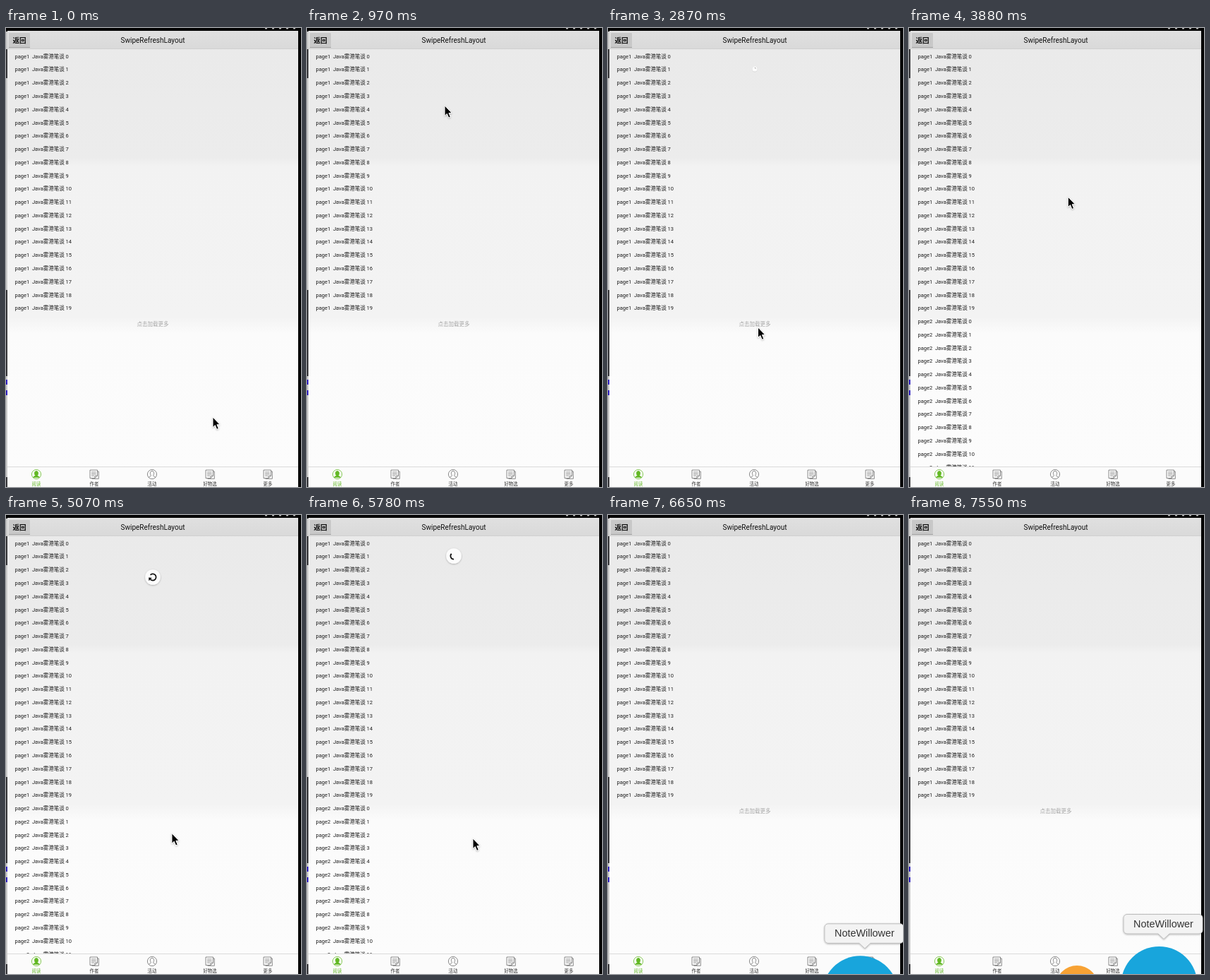
An HTML page for the animation above (7.6 s loop, 418 by 650 pixels).

```html
<!DOCTYPE html>
<html lang="zh">
<head>
<meta charset="utf-8">
<title>SwipeRefreshLayout</title>
<style>
  html, body { margin: 0; width: 100%; height: 100%; overflow: hidden; background: #000; }
  svg { display: block; width: 418px; height: 650px; }
  text { font-family: Roboto, "Noto Sans CJK SC", "Noto Sans CJK", sans-serif; white-space: pre; }
  .row { font-size: 7.5px; fill: #1c1c1c; }
  .mid { text-anchor: middle; }
  .icon { fill: none; stroke: #666; stroke-width: .75; }
  .icon.on { stroke: #62b823; }
  .icon.on path { fill: #62b823; }
  .tip { font: 14.4px "Liberation Sans", Arial, sans-serif; fill: #333; }
</style>
</head>
<body>
<svg viewBox="0 0 418 650">
  <defs>
    <linearGradient id="page" x2="0" y2="1">
      <stop offset="0" stop-color="#eaeaea"/>
      <stop offset=".26" stop-color="#ececec"/>
      <stop offset=".28" stop-color="#f2f2f2"/>
      <stop offset=".64" stop-color="#f3f3f3"/>
      <stop offset=".68" stop-color="#fbfbfb"/>
      <stop offset="1" stop-color="#fcfcfc"/>
    </linearGradient>
    <linearGradient id="bar" x2="0" y2="1">
      <stop offset="0" stop-color="#e0e0e0"/>
      <stop offset="1" stop-color="#d9d9d9"/>
    </linearGradient>
    <clipPath id="body"><rect x="2" y="30" width="412" height="592"/></clipPath>
    <filter id="soft" x="-40%" y="-40%" width="180%" height="180%">
      <feDropShadow dx="0" dy=".8" stdDeviation="1" flood-opacity=".3"/>
    </filter>
    <g id="person">
      <circle r="6.6"/>
      <path d="M-4.7 4.7C-4 2.6 -1.5 3 -1.5 1.6C-3.3 -.4 -3 -4.6 0 -4.6S3.3 -.4 1.5 1.6C1.5 3 4 2.6 4.7 4.7"/>
    </g>
    <path id="note" d="M-6 -6H4.5V2L1 5.5H-6ZM4.5 2H1V5.5M4.5 -4H6.3V6.3H-3.5M-4 -3H2.6M-4 -.5H2.6M-4 2H0"/>
  </defs>

  <rect width="418" height="650"/>
  <!-- sliver of the desktop behind the window -->
  <rect y="5" width="2" height="645" fill="#cbcbcb"/>
  <path d="M0 30h2v41h-2zM0 371h2v122h-2zM0 636h2v14h-2z" fill="#38383b"/>
  <path d="M0 498h2v7h-2zM0 513h2v7h-2z" fill="#3324c0"/>
  <path d="M367 .7H410" stroke="#bbb" stroke-width="1.4" stroke-dasharray="3 7"/>

  <rect x="2" y="30" width="412" height="592" fill="url(#page)"/>
  <g clip-path="url(#body)">
    <g id="first"></g>
    <g id="second"></g>
    <text id="more" class="mid" x="208" y="422.3" font-size="7.5" fill="#a6a6a6"></text>
    <g id="spin">
      <circle r="10.8" fill="#fcfcfc" filter="url(#soft)"/>
      <path id="arc" fill="none" stroke="#111" stroke-width="1.7"/>
      <path id="head" d="M-3 0H3L0 3.6Z" fill="#111"/>
    </g>
  </g>

  <rect x="2" y="4" width="412" height="26" fill="url(#bar)"/>
  <path d="M2 29.5H414" stroke="#d0d0d0"/>
  <rect x="4" y="7" width="30" height="21" rx="1" fill="#c8c8c8"/>
  <path d="M4 27.5H34" stroke="#a0a0a0"/>
  <text class="mid" x="19" y="21.2" font-size="9.6" font-weight="700" fill="#111">返回</text>
  <text class="mid" x="208" y="21" font-size="10" fill="#111">SwipeRefreshLayout</text>

  <rect x="2" y="621" width="412" height="29" fill="#fbfbfb"/>
  <path d="M2 621.5H414" stroke="#dadada"/>
  <g id="nav"></g>

  <g id="dock">
    <circle cx="238" cy="668" r="30" fill="#f7a234"/>
    <circle cx="354.5" cy="665" r="54" fill="#18a5dc"/>
    <path d="M309 565.5H411a5 5 0 0 1 5 5V588a5 5 0 0 1 -5 5H369L361 600.5L353 593H309a5 5 0 0 1 -5 -5V570.5a5 5 0 0 1 5 -5Z"
      fill="#f3f3f3" stroke="#bcbcbc" filter="url(#soft)"/>
    <text class="tip mid" x="360.5" y="584">NoteWillower</text>
  </g>
  <path id="mouse" d="M0 0V14.6L3.3 11.6L5.7 17.4L8.3 16.3L5.9 10.7H10.2Z" stroke="#fff" filter="url(#soft)"/>
</svg>
<script>
const LOOP = 7600;
const ROW = 18.77;
const $ = id => document.getElementById(id);
const place = (el, x, y, more = '') => el.setAttribute('transform', `translate(${x} ${y}) ${more}`);
const show = (el, on) => el.setAttribute('visibility', on ? 'visible' : 'hidden');
const part = (t, from, to) => Math.min(1, Math.max(0, (t - from) / (to - from)));
const easeOut = p => 1 - (1 - p) ** 1.77;

function buildRows(id, page, count, top) {
  $(id).innerHTML = Array.from({ length: count }, (_, i) =>
    `<text class="row" x="12.5" y="${top + ROW * i}">page${page}  Java雾港笔谈 ${i}</text>`).join('');
}
buildRows('first', 1, 20, 42.7);
buildRows('second', 2, 12, 42.7 + 20 * ROW);

$('nav').innerHTML = ['阅读', '作者', '活动', '好物选', '更多'].map((name, i) => {
  const icon = i === 0 || i === 2 ? 'person' : 'note';
  return `<g transform="translate(${43 + 82 * i} 632)">
    <use href="#${icon}" class="icon${i ? '' : ' on'}"/>
    <text class="mid" y="16.2" font-size="6.4" fill="${i ? '#333' : '#62b823'}">${name}</text></g>`;
}).join('');
// the chosen tab has a filled figure
document.querySelector('use.on').style.fill = '#62b823';
document.querySelector('use.on').outerHTML =
  `<g class="icon on">${$('person').innerHTML}</g>`;

// pointer moves: start, end, x, y
const moves = [
  [59, 60, 286, 551],
  [215, 550, 247, 171],
  [735, 970, 195, 110],
  [970, 1140, 200, 90],
  [1385, 2120, 178, 358],
  [2120, 2420, 236, 508],
  [2420, 2930, 212, 422],
  [3655, 4180, 233, 132],
  [4665, 5125, 235, 458],
  [6125, 6375, 355, 670]
];

function drawMouse(t) {
  let x = 293, y = 551;
  for (const [from, to, nx, ny] of moves) {
    const p = easeOut(part(t, from, to));
    x += (nx - x) * p;
    y += (ny - y) * p;
  }
  place($('mouse'), x, y);
}

const pulls = [
  { from: 1440, free: 1850, end: 2920 },
  { from: 4720, free: 5120, end: 6000 }
];

function drawSpin(t) {
  const pull = pulls.find(p => t >= p.from && t < p.end);
  const drag = pull && t < pull.free;
  show($('spin'), pull);
  show($('head'), drag);
  if (!pull) return;

  const { from, free, end } = pull;
  const amount = easeOut(part(t, from, from + 300));
  const y = 38 + 50 * amount - 30 * part(t, free, free + 150);
  place($('spin'), 208, y, `scale(${part(t, end, end - 150)})`);

  const run = t - free - 270;
  const mid = drag ? (amount - 1) * 150 : run * .4;
  const span = drag ? 60 + 215 * amount : 165 + 110 * Math.cos(run / 212);
  const r = 4.6, rad = Math.PI / 180;
  const point = deg => [r * Math.cos(deg * rad), r * Math.sin(deg * rad)];
  const tail = point(mid - span / 2), tip = point(mid + span / 2);
  $('arc').setAttribute('d', `M${tail}A${r} ${r} 0 ${span > 180 ? 1 : 0} 1 ${tip}`);
  $('arc').setAttribute('opacity', drag ? .3 + .7 * amount : 1);
  place($('head'), ...tip, `rotate(${mid + span / 2})`);
}

function draw(t) {
  drawMouse(t);
  drawSpin(t);

  const loaded = t >= 3530 && t < 5850;
  show($('second'), loaded);
  show($('more'), !loaded);
  $('more').textContent = t >= 3230 && t < 3530 ? '正在加载…' : '点击加载更多';

  const left = 1 - part(t, 6360, 6770);
  show($('dock'), t >= 6300);
  place($('dock'), 10 * left, 46 * left);
}

const start = performance.now();
function tick() {
  draw((performance.now() - start) % LOOP);
  requestAnimationFrame(tick);
}
tick();
</script>
</body>
</html>
```
